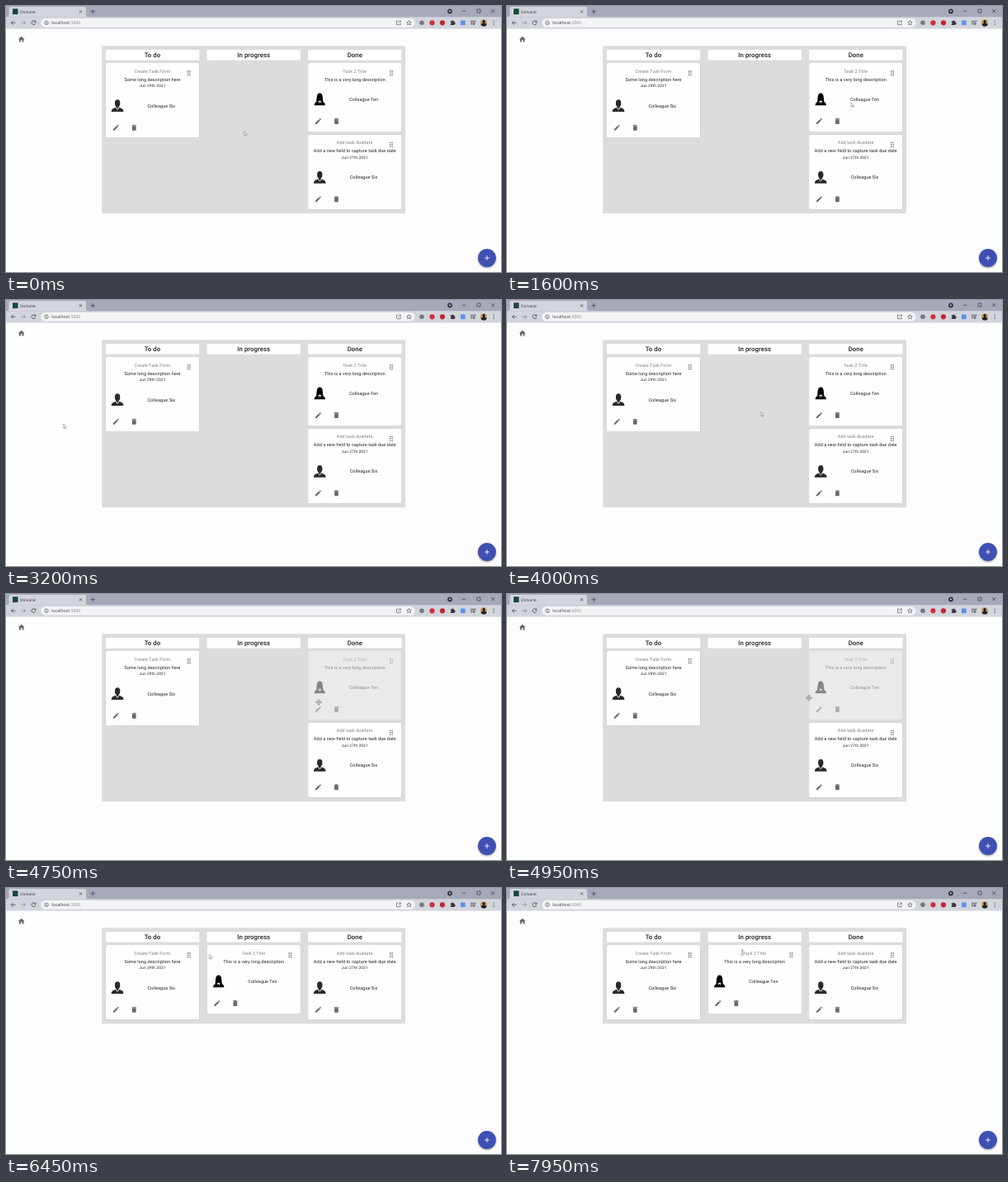
Write an HTML page that moves like this. It is 600 px wide and 322 px high and loops after 8 s.

```html
<!DOCTYPE html>
<html lang="en">
<head>
<meta charset="utf-8">
<title>Task board</title>
<style>
html, body { margin: 0; width: 100%; height: 100%; overflow: hidden; background: #fdfdfd; }
svg { display: block; width: 600px; height: 322px; }
text { font-family: Roboto, sans-serif; text-rendering: geometricPrecision; fill: #212121; }
.chrome text { font-family: "Open Sans", "Noto Sans", sans-serif; font-size: 5.2px; fill: #33343a; }
.line { fill: none; stroke: #45464d; stroke-width: .8; }
.head { font-size: 7.81px; font-weight: 500; letter-spacing: .0075em; text-anchor: middle; }
.body { font-size: 5.47px; letter-spacing: .01071em; text-anchor: middle; }
.date { font-size: 4.69px; letter-spacing: .0333em; text-anchor: middle; }
.muted { fill: #808080; }
.icon { fill: #686868; }
.paper { fill: #fefefe; filter: drop-shadow(0 .6px .5px #0006); }

.board, #moved, #below, #target, .cursor, .cursor > * { animation: 8s step-end infinite; }
.board { animation-name: shrink; }
#moved { animation-name: drag; }
#below { animation-name: rise; }
#target { animation-name: hover; opacity: 0; }
@keyframes shrink { 0% { height: 202.8px; } 75.6%, 100% { height: 116px; } }
@keyframes drag {
  0% { opacity: 1; transform: translate(366.1px, 69px); }
  55% { opacity: .4; transform: translate(366.1px, 69px); }
  75.6%, 100% { opacity: 1; transform: translate(243.5px, 69px); }
}
@keyframes rise { 0% { transform: translate(366.1px, 155.6px); } 75.6%, 100% { transform: translate(366.1px, 69px); } }
@keyframes hover { 0% { opacity: 0; } 62.5% { opacity: 1; } 75.6%, 100% { opacity: 0; } }

.cursor { animation-name: travel; animation-timing-function: ease-in-out; }
@keyframes travel {
  0%, 7% { transform: translate(288.6px, 151.5px); }
  18%, 23% { transform: translate(417px, 117px); }
  36%, 42% { transform: translate(69.5px, 150px); }
  54%, 59.5% { transform: translate(379px, 131px); }
  70%, 72% { transform: translate(256.5px, 82px); }
  79%, 85% { transform: translate(246.5px, 80.3px); }
  97%, 100% { transform: translate(285.2px, 78px); }
}
#arrow { animation-name: arrow; }
#move { animation-name: move; opacity: 0; }
#parcel { animation-name: parcel; opacity: 0; }
#beam { animation-name: beam; opacity: 0; }
@keyframes arrow { 0% { opacity: 1; } 55% { opacity: 0; } 62.5% { opacity: 1; } 96%, 100% { opacity: 0; } }
@keyframes move { 0% { opacity: 0; } 55% { opacity: .6; } 62.5%, 100% { opacity: 0; } }
@keyframes parcel { 0% { opacity: 0; } 62.5% { opacity: 1; } 75.6%, 100% { opacity: 0; } }
@keyframes beam { 0% { opacity: 0; } 96%, 100% { opacity: 1; } }
</style>
</head>
<body>
<svg viewBox="0 0 600 322">
  <defs>
    <path id="pencil" d="M3 17.25V21h3.75L17.81 9.94l-3.75-3.75zM20.71 7.04a1 1 0 0 0 0-1.41l-2.34-2.34a1 1 0 0 0-1.41 0l-1.83 1.83 3.75 3.75z"/>
    <path id="bin" d="M6 19a2 2 0 0 0 2 2h8a2 2 0 0 0 2-2V7H6zM19 4h-3.5l-1-1h-5l-1 1H5v2h14z"/>
    <path id="home" d="M10 20v-6h4v6h5v-8h3L12 3 2 12h3v8z"/>
    <g id="man">
      <path fill="#292929" d="M-7.3 7.4C-7.3 3.8-5.5 3.5-2 2.1H2C5.5 3.5 7.3 3.8 7.3 7.4z"/>
      <path fill="#fff" d="M-2 2 0 7 2 2z"/>
      <path fill="#292929" d="M-.7 2.6H.7L.4 3.6.9 6 0 7.2-.9 6-.4 3.6z"/>
      <ellipse fill="#292929" cy="-3" rx="3.2" ry="4.4"/>
      <path fill="#292929" d="M-1.6 0h3.2v2L0 3.1-1.6 2z"/>
    </g>
    <g id="woman">
      <path d="M-6.6 7.3C-6.6 4-5 3.4-2 2.4H2C5 3.4 6.6 4 6.6 7.3z"/>
      <path d="M-4.3 2.8C-3.2-1-4.4-7.4 0-7.4S3.2-1 4.3 2.8L2 3.2H-2z"/>
      <path fill="#fff" d="M-1.8 2.4 0 6.8 1.8 2.4 1 1.7H-1z"/>
      <path d="M-.5 3H.5L.8 5.6 0 7-.8 5.6z"/>
    </g>
  </defs>

  <g class="chrome">
    <rect width="600" height="14" fill="#a5a9b8"/>
    <rect y="13.3" width="600" height="14.3" fill="#d3d5dd"/>
    <path fill="#d3d5dd" d="M1 13.5Q3.5 13.3 3.5 11V3Q3.5 1 5.5 1H95Q97 1 97 3V11Q97 13.3 99.5 13.5z"/>
    <rect x="8" y="3.3" width="6.5" height="6.8" fill="#194638"/>
    <text x="17" y="8.7" style="font-size:4.9px">Dolvane</text>
    <path class="line" d="M89 5.3l3 3m0-3-3 3M102.5 6.8h5.4m-2.7-2.7v5.4M552.8 6.2h4.5M571 4h4v4h-4zM588.2 4.2l4 4m0-4-4 4"/>
    <circle cx="538" cy="6.5" r="2.9" fill="#35363c"/>
    <path d="M536.7 5.8h2.6l-1.3 1.7z" fill="#fff"/>

    <rect x="42.5" y="15" width="453" height="10.8" rx="5.4" fill="#f3f4f6"/>
    <path class="line" d="M11.5 20.3H6.3m2.4-2.4-2.4 2.4 2.4 2.4"/>
    <path class="line" style="stroke:#8c8e97" d="M18.5 20.3h5.2m-2.4-2.4 2.4 2.4-2.4 2.4"/>
    <path class="line" d="M35.3 18.6a2.4 2.4 0 1 0 .5 2.3M36 17.5v2h-2"/>
    <circle class="line" cx="49" cy="20.3" r="2.3" style="stroke-width:.6"/>
    <path class="line" d="M49 20v1.5M49 18.8v.6"/>
    <text x="55.3" y="22.2">localhost<tspan fill="#85868c">:3000</tspan></text>
    <path class="line" style="stroke-width:.6" d="M475.5 18h-2v4.7h4.7v-2M475.6 20.7l2.7-2.7m-1.8 0h1.8v1.8"/>
    <path class="line" style="stroke-width:.6" d="M488.5 17.5l.8 1.9 2 .2-1.5 1.3.5 2-1.8-1.1-1.8 1.1.5-2-1.5-1.3 2-.2z"/>
    <circle cx="504" cy="20.3" r="2.8" fill="#777981"/>
    <circle cx="516.5" cy="20.3" r="3.1" fill="#cf2e3b"/>
    <circle cx="529" cy="20.3" r="3.1" fill="#c22632"/>
    <path fill="#35363c" d="M538.8 18.5h1.4a1 1 0 0 1 2 0h1.5v1.4a1 1 0 0 1 0 2V23h-4.9v-1.2a.9.9 0 0 0 0-1.8z"/>
    <rect x="551" y="17.5" width="5.7" height="5.7" fill="#5e91e8"/>
    <path class="line" d="M563 18.2h4.2M563 20h4.2M563 21.8h2.3M568 22v-4h1.5"/>
    <circle cx="566.9" cy="22" r=".9" fill="#45464d"/>
    <circle cx="579" cy="20.3" r="4" fill="#c59a57"/>
    <path fill="#221f20" d="M575.5 22.4q1-1.5 2.5-1.5-1.3-4 1.1-4t1.2 4q1.7 0 2.5 1.5a4 4 0 0 1-7.3 0z"/>
    <g fill="#45464d"><circle cx="591.2" cy="18.2" r=".6"/><circle cx="591.2" cy="20.3" r=".6"/><circle cx="591.2" cy="22.4" r=".6"/></g>
  </g>

  <use href="#home" class="icon" transform="translate(14 35.6) scale(.39)"/>
  <rect class="board" x="116.2" y="48.3" width="367.8" height="202.8" fill="#dcdcdc"/>
  <rect id="target" class="board-column" x="238.8" y="48.3" width="122.6" height="202.8" fill="#b9b9b9"/>
  <g id="content"></g>

  <g style="filter:drop-shadow(0 1.2px 1.2px #0006)"><circle cx="583" cy="305" r="10.9" fill="#3f4fb3"/></g>
  <path d="M580.2 305h5.6m-2.8-2.8v5.6" stroke="#fff" stroke-width=".9"/>

  <g class="cursor">
    <path id="arrow" d="M0 0V5.1L1.2 4 2 5.9 2.9 5.5 2.1 3.7H3.7z" fill="#fff" stroke="#555" stroke-width=".45"/>
    <path id="move" d="M0-4 1.5-2.2H.6V-.6H2.2V-1.5L4 0 2.2 1.5V.6H.6V2.2H1.5L0 4-1.5 2.2H-.6V.6H-2.2V1.5L-4 0-2.2-1.5V-.6H-.6V-2.2H-1.5z" fill="#888" stroke="#777" stroke-width=".5"/>
    <rect id="parcel" x="1.4" y="3" width="2.7" height="2.7" fill="#d8d8d8" stroke="#666" stroke-width=".45"/>
    <path id="beam" d="M-1.2-3H1.2M0-3V3M-1.2 3H1.2" fill="none" stroke="#444" stroke-width=".6"/>
  </g>
</svg>
<script>
const COLUMN = 122.6;

const label = (kind, x, y, words) => `<text class="${kind}" x="${x}" y="${y}">${words}</text>`;
const icon = (name, x, y) =>
  `<use href="#${name}" class="icon" transform="translate(${x - 4.7} ${y - 4.7}) scale(.39)"/>`;

function header(title, column) {
  const x = 120.9 + column * COLUMN;
  return `<rect x="${x}" y="53" width="113.4" height="12.6" fill="#fefefe"/>` +
    label("head", x + 56.7, 62, title);
}

function grip() {
  let dots = "";
  for (let i = 0; i < 6; i++)
    dots += `<circle class="icon" cx="${99.7 + i % 2 * 2.35}" cy="${9.9 + (i >> 1) * 2.35}" r=".78"/>`;
  return dots;
}

function card({ id, x = 0, y = 0, title, detail, date, avatar, owner }) {
  const drop = date ? 7.7 : 0;
  return `<g id="${id}" transform="translate(${x} ${y})">
    <rect class="paper" width="113.4" height="${82.9 + drop}" rx="1.5"/>
    ${label("body muted", 56.5, 11.9, title)}${grip()}
    ${label("body", 56.7, 21.7, detail)}
    ${date ? label("date", 56.6, 29.2, date) : ""}
    <use href="#${avatar}" x="14.2" y="${44 + drop}"/>
    ${label("body", 67.4, 45.9 + drop, owner)}
    ${icon("pencil", 12.4, 70.5 + drop)}${icon("bin", 34.4, 70.5 + drop)}
  </g>`;
}

document.getElementById("content").innerHTML =
  ["To do", "In progress", "Done"].map(header).join("") +
  card({ id: "first", x: 120.9, y: 69, title: "Create Task Form", detail: "Some long description here",
    date: "Jun 29th 2021", avatar: "man", owner: "Colleague Six" }) +
  card({ id: "moved", title: "Task 2 Title", detail: "This is a very long description",
    avatar: "woman", owner: "Colleague Ten" }) +
  card({ id: "below", title: "Add task duedate", detail: "Add a new field to capture task due date",
    date: "Jun 27th 2021", avatar: "man", owner: "Colleague Six" });
</script>
</body>
</html>
```
